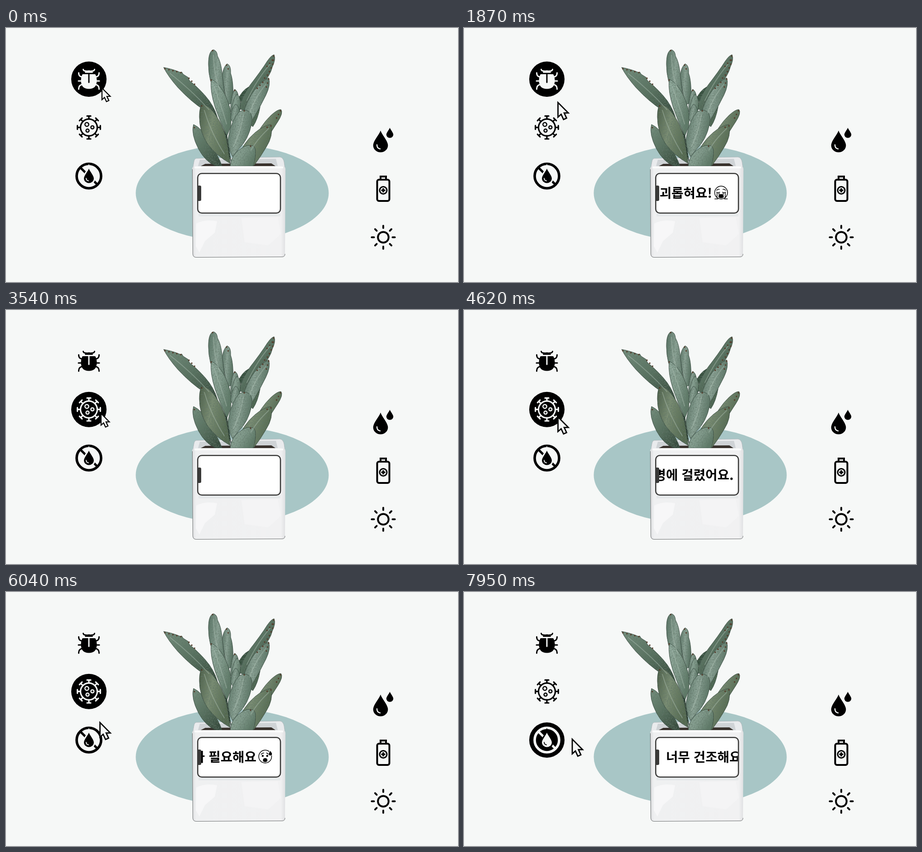
An HTML page that plays this animation: 998 px wide and 561 px high, repeating every 8000 ms.

```html
<!DOCTYPE html>
<html lang="ko">
<head>
<meta charset="utf-8">
<title>Talking plant</title>
<style>
  html, body { margin: 0; width: 100%; height: 100%; overflow: hidden; background: #f6f8f7; }
  svg { position: absolute; left: 0; top: 0; width: 998px; height: 561px; }
  .message text { font: 700 28.7px "Noto Sans CJK KR", "Noto Sans CJK", sans-serif; white-space: pre; }
  .icon { color: #000; --gap: #f6f8f7; }
  .icon.on { color: #f6f8f7; --gap: #000; }
  .disc { fill: #000; visibility: hidden; }
  .on .disc { visibility: visible; }
  .fill { fill: currentColor; }
  .line { fill: none; stroke: currentColor; stroke-linecap: round; }
  .gap { fill: none; stroke: var(--gap); stroke-linecap: round; }
  .leaf path { stroke: #33453a; stroke-width: .9; }
  .rib path { fill: none; stroke: #b4c5ba; stroke-width: 2; stroke-linecap: round; opacity: .4; }
  .spots path { fill: none; stroke: #553c2b; stroke-width: 3.4; stroke-linecap: round; stroke-dasharray: 0 9; }
  .face { fill: none; stroke: #000; stroke-width: 1.5; stroke-linecap: round; }
</style>
</head>
<body>
<svg viewBox="0 0 998 561">
  <defs>
    <linearGradient id="mid" x2="1" y2=".3">
      <stop stop-color="#567162"/><stop offset=".5" stop-color="#8ba295"/><stop offset="1" stop-color="#5b7565"/>
    </linearGradient>
    <linearGradient id="pale" x2="1" y2=".5">
      <stop stop-color="#91aa9d"/><stop offset=".55" stop-color="#829b8c"/><stop offset="1" stop-color="#5f7a68"/>
    </linearGradient>
    <linearGradient id="deep" x2=".8" y2="1">
      <stop stop-color="#76907f"/><stop offset=".55" stop-color="#566f5d"/><stop offset="1" stop-color="#364a3c"/>
    </linearGradient>
    <linearGradient id="olive" x2="1" y2=".4">
      <stop stop-color="#4a5c45"/><stop offset=".45" stop-color="#7a8d73"/><stop offset="1" stop-color="#54694f"/>
    </linearGradient>
    <linearGradient id="clay" x2="1">
      <stop stop-color="#dcdddf"/><stop offset=".04" stop-color="#eff0f1"/>
      <stop offset=".95" stop-color="#f1f1f2"/><stop offset="1" stop-color="#dfe0e2"/>
    </linearGradient>
    <!-- velvety mottling of the leaves -->
    <filter id="velvet">
      <feTurbulence type="fractalNoise" baseFrequency=".35" numOctaves="2" seed="4"/>
      <feColorMatrix values="0 0 0 0 .12  0 0 0 0 .18  0 0 0 0 .14  0 1.8 0 0 -.75"/>
      <feComposite in2="SourceAlpha" operator="in" result="grain"/>
      <feMerge><feMergeNode in="SourceGraphic"/><feMergeNode in="grain"/></feMerge>
    </filter>
  </defs>

  <ellipse cx="499.5" cy="364.5" rx="213" ry="106" fill="#a8c6c6"/>

  <!-- pot -->
  <path d="M420 288L605 285Q612 286 614 296L617 318H411L415 295Q416 289 420 288Z" fill="#e9ebed" stroke="#aeb3b6" stroke-width=".8"/>
  <path d="M428 291L596 289L600 305H424Z" fill="#cfd3d6"/>
  <path d="M430 305L440 300L586 299L595 305Z" fill="#39322d"/>

  <g class="leaf" filter="url(#velvet)">
    <path fill="#2c3d31" d="M466 200L488 238L497 295L478 245Z"/>
    <path fill="url(#deep)" d="M348 87Q369 91 385 98L388 97L391 102L402 109L405 116Q432 138 449 161Q465 184 469 207Q452 194 437 181Q409 163 380 132Q358 107 348 87Z"/>
    <path fill="#36503c" d="M512 158Q521 138 536 130Q533 150 518 163Z"/>
    <path fill="#4d6651" d="M561 174Q556 202 545 218L538 212Z"/>
    <path fill="url(#mid)" d="M488 79Q497 82 496 100Q503 119 501 165L488 170L477 105Q480 86 488 79Z"/>
    <path fill="url(#mid)" d="M458 48Q466 50 467 62Q475 76 477 100L490 205L465 150Q447 118 447 80Q447 51 458 48Z"/>
    <path fill="url(#deep)" d="M592 59Q596 70 588 86Q584 104 565 126L532 186L515 178Q520 153 539 126Q563 95 577 73Q586 60 592 59Z"/>
    <path fill="url(#mid)" d="M505 135Q514 141 513 158L508 185H496Q495 150 505 135Z"/>
    <path fill="url(#pale)" d="M510 146Q520 153 517 180L508 200L498 192Q499 156 510 146Z"/>
    <path fill="url(#mid)" d="M580 110Q585 125 574 148Q560 177 541 208L525 184Q531 164 545 142Q561 119 580 110Z"/>
    <path fill="url(#pale)" d="M453 113Q476 124 490 163Q500 187 496 218L488 238Q473 208 462 176Q450 139 453 113Z"/>
    <path fill="url(#mid)" d="M507 168Q518 175 516 194L505 215L496 200Q497 177 507 168Z"/>
    <path fill="url(#olive)" d="M607 180Q613 187 600 207L580 238L547 250Q561 216 585 193Q599 180 607 180Z"/>
    <path fill="url(#olive)" d="M585 213Q591 238 574 264Q562 285 547 304L513 285Q523 254 550 231Q569 215 585 213Z"/>
    <path fill="url(#deep)" d="M414 213Q434 222 449 252Q469 282 477 305H463Q440 295 425 267Q408 234 414 213Z"/>
    <path fill="url(#mid)" d="M526 181Q548 184 542 213Q535 246 515 266L500 284Q488 261 491 241Q498 201 516 184Z"/>
    <path fill="url(#olive)" d="M434 169Q446 169 459 187Q485 219 491 272L495 299Q464 282 445 256Q427 229 427 196Q427 173 434 169Z"/>
    <path fill="url(#pale)" d="M540 259Q552 258 551 278Q550 295 545 305H495Q497 280 519 266Q530 259 540 259Z"/>
  </g>
  <g class="rib">
    <path d="M362 100Q410 138 448 180"/>
    <path d="M458 60Q459 105 472 135"/>
    <path d="M583 80Q555 112 532 160"/>
    <path d="M574 124Q548 156 538 188"/>
    <path d="M459 128Q475 170 487 212"/>
    <path d="M438 182Q452 230 482 278"/>
    <path d="M524 192Q518 230 502 262"/>
    <path d="M580 222Q554 246 541 270"/>
  </g>
  <g class="spots">
    <path d="M351 90L388 99M404 111L420 128"/>
    <path d="M456 50H461M487 82L493 96"/>
    <path d="M591 62L589 80L579 102L567 115M588 71L571 91"/>
    <path d="M580 113L574 133M567 120L549 139"/>
    <path d="M432 172H437M453 115V116M526 183H531M505 138V139"/>
    <path d="M606 183L594 205M585 216L572 221M416 220V221M540 261H541"/>
  </g>

  <path d="M411 312Q411 305 418 305H610Q617 305 617 312L616 499Q616 506 609 506L419 507Q412 507 412 499Z" fill="url(#clay)"/>
  <path d="M411.500 312L412.500 499Q413 506.500 420 506.500L610 505.500Q616 505 616 499" fill="none" stroke="#6c6f70"/>
  <path d="M416 308H612" stroke="#fafbfb" stroke-width="4"/>
  <path d="M420 432Q440 421 466 427L461 452L439 471L427 496L419 482Z" fill="#f7f7f8"/>
  <path d="M520 420L600 418L607 455L579 480L527 473Z" fill="#f4f4f5"/>
  <path d="M425 413H606" stroke="#dfe4e6" stroke-width="6" opacity=".6"/>

  <!-- right-hand icons -->
  <defs>
    <path id="drop" d="M0-1C.12-.62 .68-.04 .68 .36A.68 .64 0 0 1-.68 .36C-.68-.04-.12-.62 0-1Z"/>
  </defs>
  <use href="#drop" transform="translate(827 250.500) scale(24)"/>
  <use href="#drop" transform="translate(847.500 231.500) scale(11.300)"/>
  <path d="M819 258Q819 266 826 267" fill="none" stroke="#f6f8f7" stroke-width="2.400" stroke-linecap="round"/>
  <g fill="none" stroke="#000" stroke-width="4">
    <rect x="819.500" y="335" width="27" height="47" rx="4"/>
    <path d="M827 334V328H839V334"/>
    <circle cx="833" cy="358.500" r="8" stroke-width="3"/>
    <path d="M833 354V363M828.500 358.500H837.500" stroke-width="3.600"/>
    <circle cx="833" cy="462.300" r="11.800"/>
    <g id="rays" stroke-linecap="round" transform="translate(833 462.300)"></g>
  </g>

  <!-- left-hand icons -->
  <g class="icon" transform="translate(183 113)">
    <circle class="disc" r="39"/>
    <path class="fill" d="M-14-11H14Q17.500-5 17.500 3Q17.500 21.500 0 21.500Q-17.500 21.500-17.500 3Q-17.500-5-14-11ZM-9-14Q-8-19.500 0-19.500Q8-19.500 9-14Z"/>
    <path class="gap" stroke-width="3" stroke-linecap="butt" d="M0-12V7"/>
    <g id="legs">
      <path class="line" stroke-width="3" d="M-12.500-21.500Q-11.500-17.500-6-18M-16-5Q-22.500-6-22.500-14M-16 4H-23M-15 12Q-22.500 13-22.500 22"/>
    </g>
    <use href="#legs" transform="scale(-1 1)"/>
  </g>
  <g class="icon" transform="translate(183 219.700)">
    <circle class="disc" r="39"/>
    <circle class="line" r="18.500" stroke-width="3.200"/>
    <g class="line" id="spikes" stroke-width="3.200"></g>
    <g class="line" stroke-width="2.500">
      <circle cx="-4.500" cy="-6.700" r="4.200"/><circle cx="7.800" cy="-.3" r="3.400"/><circle cx="-3" cy="7" r="3.400"/>
    </g>
  </g>
  <g class="icon" transform="translate(183 327)">
    <circle class="disc" r="39"/>
    <circle class="line" r="27" stroke-width="5.600"/>
    <path class="line" stroke-width="5.200" d="M-18-18L18 18"/>
    <use href="#drop" class="gap" stroke-width=".4" transform="translate(0 -.5) scale(16)"/>
    <use href="#drop" class="fill" transform="translate(0 -.5) scale(16)"/>
    <path class="gap" stroke-width="1.900" d="M-6 5Q-5.500 10-1 10.500"/>
  </g>

  <!-- phone -->
  <clipPath id="screen"><rect x="424" y="322" width="180.500" height="86" rx="8"/></clipPath>
  <rect x="423.300" y="321.300" width="182.700" height="87.400" rx="9" fill="#fff" stroke="#393938" stroke-width="2.600"/>
  <g clip-path="url(#screen)">
    <g class="message">
      <text y="374.500">벌레가 저를 괴롭혀요!</text>
      <g class="face" transform="translate(284 363.500)">
        <circle r="14.200"/>
        <path d="M-10-5Q-7-8-4-7M10-5Q7-8 4-7M-10-1Q-7 2-3-1M10-1Q7 2 3-1M-9 1V12M-4.500 1V7M9 1V12M4.500 1V7M-14 14H-7M14 14H7"/>
        <path d="M-5 10Q-5 4 0 4Q5 4 5 10Q0 13-5 10Z" fill="#000"/>
      </g>
    </g>
    <g class="message">
      <text y="374.500">병에 걸렸어요. 치료가 필요해요</text>
      <g class="face" transform="translate(396 363.500)">
        <circle r="14.200"/>
        <path d="M-9-5Q-6-8-3-8M8-4Q6-7 3-8"/>
        <circle cx="-5.500" cy="-1.500" r="1.500" fill="#000"/><circle cx="4.500" cy="-1.500" r="1.500" fill="#000"/>
        <path d="M-4 6Q0 2 4 6L4 10Q0 13-4 10Z" fill="#000"/>
        <use href="#drop" fill="#000" stroke="#fff" stroke-width=".2" transform="translate(11.500 -8) scale(6)"/>
      </g>
    </g>
    <g class="message"><text y="374.500">너무 건조해요</text></g>
  </g>
  <path d="M423 348H428Q431 348 431 351V379Q431 382 428 382H423Z" fill="#393938"/>

  <path id="cursor" d="M-12-18V14.200L-5 8L.3 19.500L7 16.500L1.700 5H10.800Z" fill="#f6f8f7" stroke="#000" stroke-width="2.800"/>
</svg>

<script>
  const LOOP = 8000, FRAME = 1000 / 24;
  const TEXT_SPEED = 0.1717;
  const PRESS = 400, MOVE_DELAY = 600, MOVE_TIME = 2730;

  // textX is the left end of the message at time textAt.
  const scenes = [
    { start: 0,    textX: 391,   textAt: 1250, from: [219.5, 149], to: [219.5, 245], nudge: 2 },
    { start: 3541, textX: 419.5, textAt: 4625, from: [219.5, 245], to: [219.5, 346], nudge: 0 },
    { start: 7041, textX: 446,   textAt: 7958, from: [219.5, 346], to: [834, 290],   nudge: 0 }
  ];
  const icons = document.querySelectorAll('.icon');
  const messages = document.querySelectorAll('.message');
  const cursor = document.getElementById('cursor');

  function ring(id, d) {
    document.getElementById(id).innerHTML = Array.from({ length: 8 },
      (_, i) => `<path d="${d}" transform="rotate(${i * 45})"/>`).join('');
  }
  ring('rays', 'M0-20.500V-25.500');
  ring('spikes', 'M0-19V-25M-4-25.300H4');

  const clamp = v => Math.min(1, Math.max(0, v));

  function render(t) {
    const active = scenes.findLastIndex(s => t >= s.start);
    const { start, textX, textAt, from, to, nudge } = scenes[active];
    icons.forEach((icon, i) => icon.classList.toggle('on', i === active));
    messages.forEach((m, i) => m.setAttribute('visibility', i === active ? 'visible' : 'hidden'));
    messages[active].setAttribute('transform', `translate(${textX - TEXT_SPEED * (t - textAt)} 0)`);

    const press = (1 - clamp((t - start) / PRESS)) ** 2;
    const move = clamp((t - start - MOVE_DELAY) / MOVE_TIME) ** 1.38;
    const x = from[0] + (to[0] - from[0]) * move + nudge * press;
    const y = from[1] + (to[1] - from[1]) * move;
    cursor.setAttribute('transform',
      `translate(${x} ${y - 10}) scale(${1 - 0.2 * press}) translate(0 10)`);
  }

  // The picture advances in 24 steps per second.
  const origin = performance.now();
  function tick() {
    const t = (performance.now() - origin) % LOOP;
    render(Math.floor((t + 8) / FRAME) * FRAME % LOOP);
    requestAnimationFrame(tick);
  }
  tick();
</script>
</body>
</html>
```
